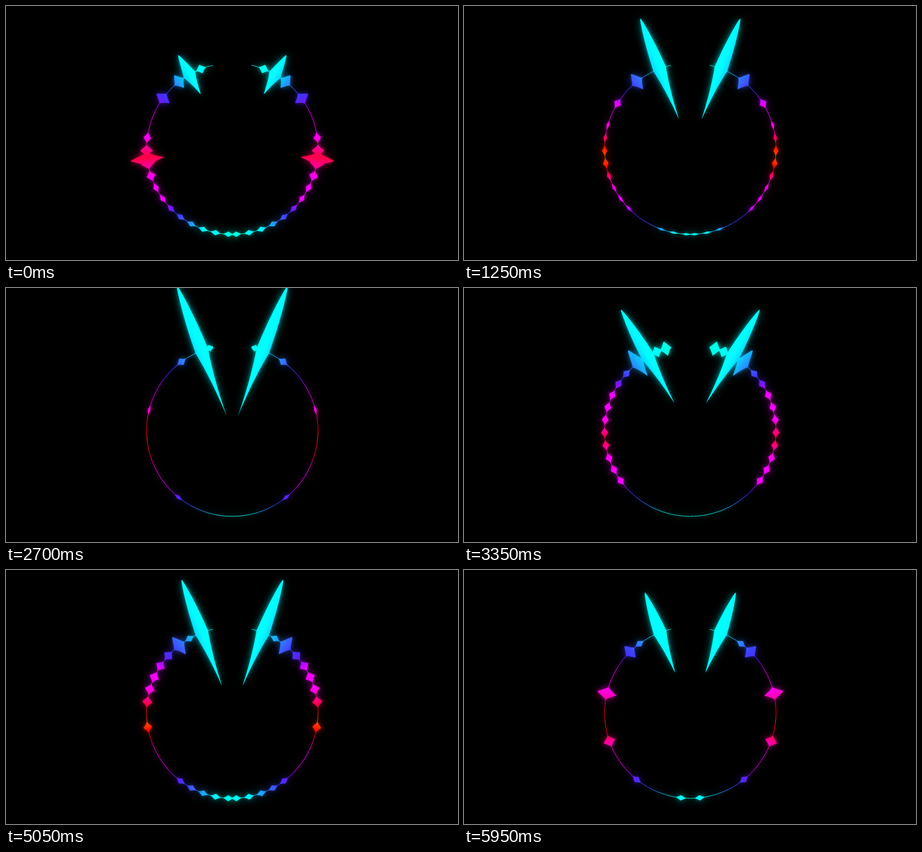
These frames come from a looping animation (777x437 px, 6 s). An HTML page with a canvas:

```html
<!DOCTYPE html>
<html lang="en">
<head>
<meta charset="utf-8">
<title>Circular spectrum</title>
<style>
  html, body { margin: 0; width: 100%; height: 100%; overflow: hidden; background: #000; }
  canvas { display: block; }
</style>
</head>
<body>
<canvas id="stage" width="777" height="437"></canvas>
<script>
const ctx = document.getElementById('stage').getContext('2d');
const W = 777, H = 437, CX = 389, CY = 245.5, R = 147.3;
const LOOP = 6000, STEP = 50, GAP = 13, LINE = 0.4;
const BAND = 8.6, LAST_BAND = 177.3;
const RAD = Math.PI / 180;

const mix = (a, b, k) => a + (b - a) * k;
const ease = k => k * k * (3 - 2 * k);
const bell = x => Math.exp(-x * x);

// Peaks are [degrees from the top, height].
// A ripple puts one on each band, with an optional swell at the side of the ring.
function ripple(from, to, size, swell = 0) {
  const peaks = [];
  for (let a = LAST_BAND; a > GAP; a -= BAND) {
    if (a >= from && a <= to) peaks.push([a, size + swell * bell((a - 97) / 12)]);
  }
  return peaks;
}

const pose = (warm, ...peaks) => ({ warm, peaks });

const tail = ripple(82, 178, 4, 8);
const clap = pose(0, [21.5, 7], [30, 38], [38.4, 13], [54, 13], [97, 28], ...tail);
const burst = pose(0, [20.7, 16], [30, 36], [40.5, 10], [67, 12], [97, 28], ...tail);
const kick = pose(1, [21, 92], [38.4, 16], [58, 6], ...ripple(74, 135, 2, 2.5), ...ripple(157, 178, 1.5));
const drop = pose(0.9, [15.4, 5], [20.9, 119], [36.4, 6], [76, 2], [141, 2.5]);
const rise = pose(0, [16.6, 12], [23, 9], [29.8, 92], [37.8, 27], ...ripple(46, 128, 5.5));
const swing = pose(1, [20.9, 97], [30, 5], [38.4, 18], [99.8, 7], ...ripple(48, 84, 8), ...ripple(142, 178, 4.5));
const fall = pose(0.8, [20.7, 73], [36.4, 5], [44.7, 13], [77, 16], [109.4, 10], [141.3, 5], [173.7, 4]);
const accent = pose(0.3, [21, 75], ...clap.peaks);

const track = [
  [0, clap], [1250, kick], [2700, drop], [3350, rise],
  [4200, burst], [5050, swing], [5950, fall], [LOOP, clap]
];

// Small peaks are hollow-sided diamonds, tall ones are straight blades with a blunt tip.
function height(p, a) {
  let h = 0;
  for (const [at, size] of p.peaks) {
    const d = Math.hypot((a - at) / (2.9 + Math.min(1.2, size / 15)), 0.08) - 0.08;
    if (d < 1) h = Math.max(h, size * Math.pow(1 - d, 1.4 - Math.min(0.35, size / 200)));
  }
  return h;
}

// Hue by distance from the side of the ring
const hues = [[0, 345], [13, 303], [32, 296], [41, 252], [50, 230], [57, 203], [65, 181], [96, 167]];

function colour(a, warm) {
  const side = Math.abs(Math.min(a, 360 - a) - 95.5);
  const u = side * (1 - 0.12 * warm);
  const i = hues.findIndex(([at]) => at > u);
  const [u0, h0] = hues[i - 1], [u1, h1] = hues[i];
  const hue = mix(h0, h1, (u - u0) / (u1 - u0)) + 36 * warm * bell((side / 18) ** 2);
  return `hsl(${hue % 360}, 100%, ${50 + 12 * bell((u - 48) / 10)}%)`;
}

function ring(level) {
  const path = new Path2D();
  const n = 1700, step = (360 - 2 * GAP) / n;
  const put = (i, side) => {
    const a = GAP + i * step;
    const r = R + side * (LINE + level(Math.min(a, 360 - a)));
    path.lineTo(CX + r * Math.sin(a * RAD), CY - r * Math.cos(a * RAD));
  };
  for (let i = 0; i <= n; i++) put(i, 1);
  for (let i = n; i >= 0; i--) put(i, -1);
  path.closePath();
  return path;
}

function draw(t) {
  const i = track.findIndex(([at]) => at > t);
  const [t0, from] = track[i - 1], [t1, to] = track[i];
  const part = (t - t0) / (t1 - t0), k = ease(part);
  const beat = 0.85 * Math.sin(Math.PI * part) ** 2;
  const blend = f => mix(mix(f(from), f(to), k), f(accent), beat);

  const warm = blend(p => p.warm);
  const path = ring(a => blend(p => height(p, a)));
  const paint = ctx.createConicGradient(-Math.PI / 2, CX, CY);
  for (let a = 0; a <= 360; a += 2) paint.addColorStop(a / 360, colour(a, warm));

  ctx.filter = 'none';
  ctx.globalAlpha = 1;
  ctx.fillStyle = '#000';
  ctx.fillRect(0, 0, W, H);
  ctx.fillStyle = paint;
  for (const [blur, alpha] of [[7, 0.6], [2.5, 0.4], [0, 1]]) {
    ctx.filter = blur ? `blur(${blur}px)` : 'none';
    ctx.globalAlpha = alpha;
    ctx.fill(path);
  }
}

const start = performance.now();
let last = -1;
function tick(now) {
  const t = Math.floor((Math.max(0, now - start) % LOOP) / STEP) * STEP;
  if (t !== last) draw(last = t);
  requestAnimationFrame(tick);
}
draw(0);
requestAnimationFrame(tick);
</script>
</body>
</html>
```
